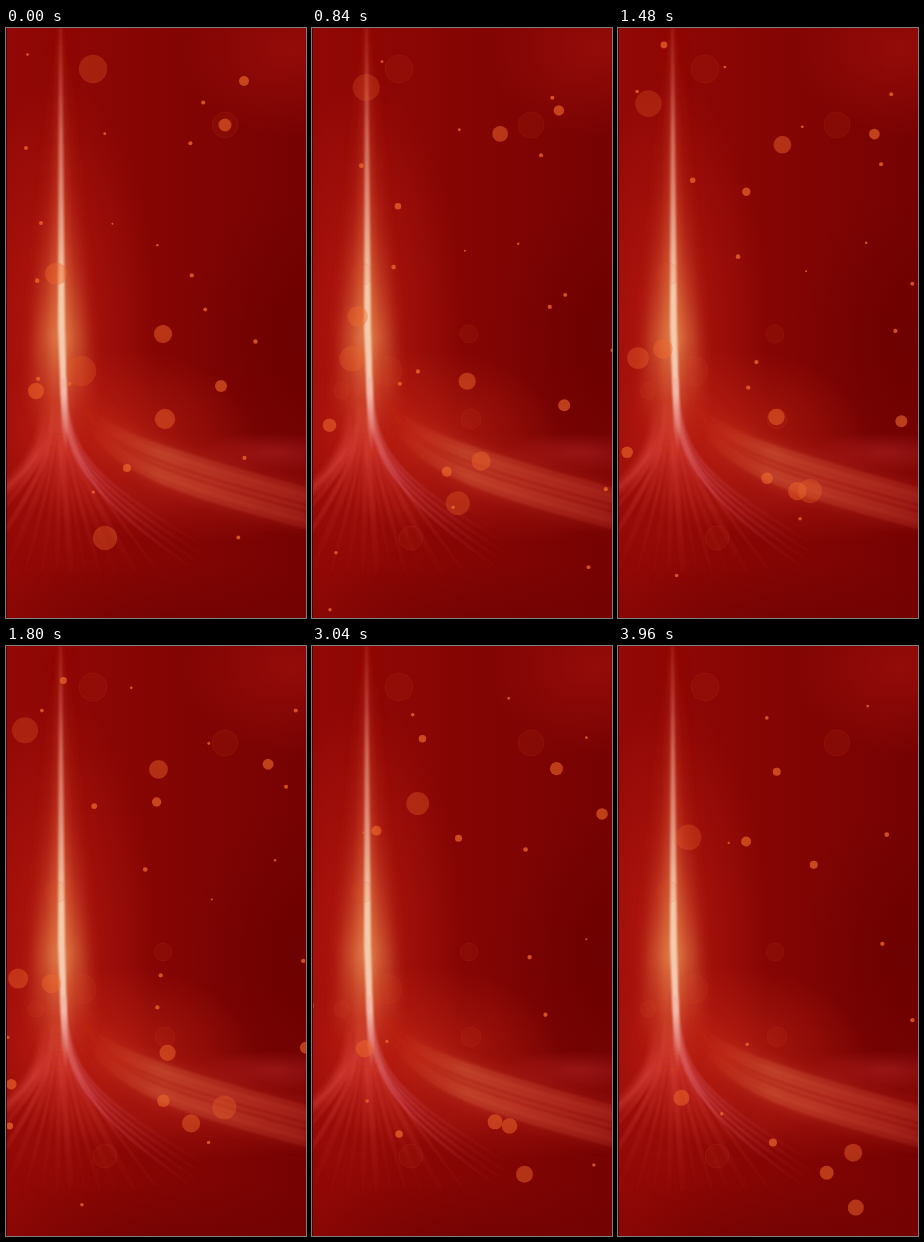
An HTML page that plays this animation: 300 px wide and 590 px high, repeating every 4 s.

```html
<!DOCTYPE html>
<html lang="en">
<head>
<meta charset="utf-8">
<title>Red light</title>
<style>
  html, body { margin: 0; width: 100%; height: 100%; overflow: hidden; background: #800404; }
  svg { display: block; width: 100vw; height: 100vh; }
</style>
</head>
<body>
<svg id="stage" viewBox="0 0 300 590" preserveAspectRatio="none">
  <defs id="defs">
    <linearGradient id="base">
      <stop offset="0" stop-color="#920806"/>
      <stop offset=".4" stop-color="#880604"/>
      <stop offset="1" stop-color="#760202"/>
    </linearGradient>
    <linearGradient id="beam" gradientUnits="userSpaceOnUse" x1="0" y1="0" x2="0" y2="430">
      <stop offset="0" stop-color="#c84438" stop-opacity=".3"/>
      <stop offset=".25" stop-color="#e08a78" stop-opacity=".75"/>
      <stop offset=".6" stop-color="#f6d6b8"/>
      <stop offset=".85" stop-color="#f8d4c0"/>
      <stop offset="1" stop-color="#e87880" stop-opacity="0"/>
    </linearGradient>
    <linearGradient id="halo" gradientUnits="userSpaceOnUse" x1="0" y1="0" x2="0" y2="430">
      <stop offset="0" stop-color="#b82820" stop-opacity=".3"/>
      <stop offset=".4" stop-color="#d04a2c" stop-opacity=".5"/>
      <stop offset=".72" stop-color="#e4844a" stop-opacity=".8"/>
      <stop offset="1" stop-color="#d84430" stop-opacity="0"/>
    </linearGradient>
    <linearGradient id="fan" gradientUnits="userSpaceOnUse" x1="0" y1="370" x2="0" y2="560">
      <stop offset="0" stop-color="#e86050" stop-opacity="0"/>
      <stop offset=".3" stop-color="#e45048" stop-opacity=".75"/>
      <stop offset="1" stop-color="#b02420" stop-opacity="0"/>
    </linearGradient>
    <linearGradient id="tail" gradientUnits="userSpaceOnUse" x1="55" y1="370" x2="195" y2="545">
      <stop offset="0" stop-color="#f0a8a0" stop-opacity=".6"/>
      <stop offset=".35" stop-color="#e0708c" stop-opacity=".85"/>
      <stop offset="1" stop-color="#c02a30" stop-opacity="0"/>
    </linearGradient>
    <linearGradient id="sweep" gradientUnits="userSpaceOnUse" x1="75" y1="0" x2="300" y2="0">
      <stop offset="0" stop-color="#d84428" stop-opacity="0"/>
      <stop offset=".35" stop-color="#e07048" stop-opacity=".85"/>
      <stop offset="1" stop-color="#cc4436" stop-opacity=".7"/>
    </linearGradient>
  </defs>
  <rect width="300" height="590" fill="url(#base)"/>
  <g id="glows"></g>
  <g id="light" fill="none"></g>
  <g id="dots" fill="#f06a2c"></g>
  <rect width="1" height="590" fill="#4a0606"/>
</svg>
<script>
const LOOP = 4000, STEP = 40;
const $ = id => document.getElementById(id);

function add(parent, tag, attrs) {
  const node = document.createElementNS($('stage').namespaceURI, tag);
  for (const k in attrs) node.setAttribute(k, attrs[k]);
  return parent.appendChild(node);
}

for (const size of [1, 3, 8]) {
  const filter = add($('defs'), 'filter',
    { id: 'b' + size, filterUnits: 'userSpaceOnUse', x: -50, y: -50, width: 400, height: 690 });
  add(filter, 'feGaussianBlur', { stdDeviation: size });
}

// Soft colour patches
function glow(cx, cy, rx, ry, color, opacity) {
  const id = 'g' + $('glows').childElementCount;
  const grad = add($('defs'), 'radialGradient', { id });
  [1, .5, 0].forEach((a, i) =>
    add(grad, 'stop', { offset: i / 2, 'stop-color': color, 'stop-opacity': a * opacity }));
  add($('glows'), 'ellipse', { cx, cy, rx, ry, fill: `url(#${id})` });
}
glow(285, 20, 110, 90, '#c01a14', .4);
glow(285, 310, 110, 150, '#640000', .5);
glow(150, 600, 220, 70, '#680202', .6);
glow(50, 300, 100, 250, '#cc2216', .6);
glow(110, 410, 140, 90, '#d02c1a', .55);
glow(200, 460, 170, 55, '#bc2018', .5);
glow(270, 424, 80, 20, '#c83034', .35);

const streak = (d, paint, width, opacity, blur) => add($('light'), 'path',
  { d, stroke: `url(#${paint})`, 'stroke-width': width, opacity, filter: `url(#b${blur})` });
const shape = (d, paint, opacity, blur) => add($('light'), 'path',
  { d, fill: `url(#${paint})`, opacity, filter: `url(#b${blur})` });

// Two bright bands with thin lines between, bending right
const bend = y => `M76 370 C88 ${y - 62} 150 ${y - 42} 305 ${y}`;
streak(bend(482), 'sweep', 34, .35, 8);
for (let i = 0; i <= 6; i++) {
  const bright = i % 4 === 1;
  streak(bend(462 + i * 6.5), 'sweep', bright ? 7 : 3, bright ? .55 : .22, bright ? 3 : 1);
}

// Fan below the beam
for (let i = 0; i < 13; i++) {
  const u = i / 12, x = -50 + u * 200, y = 500 + 70 * Math.sin(u * Math.PI * .8);
  streak(`M${46 + u * 14} 360 C${44 + u * 18} 420 ${42 + u * 26} 430 ${x} ${y}`,
    'fan', 3 + i * 5 % 4, .3 + (i * 7 % 5) * .07, 1);
}
streak('M43 340 C42 425 30 435 -10 470', 'fan', 10, .75, 3);

// Vertical beam and its pink tail
shape('M53 0 H57 C62 150 76 250 82 370 L70 430 H40 L28 370 C34 250 48 150 53 0Z', 'halo', .8, 8);
shape('M52 0 H57 L66 370 L62 425 H48 L43 370Z', 'halo', .75, 3);
shape('M53 0 H56 L59 300 L62 400 L60 430 L56 400 L52 300Z', 'beam', .9, 1);
for (let i = 0; i < 4; i++)
  streak(`M${56 + i} 350 C${57 + i * 2} 430 ${74 + i * 3} ${460 - i * 4} ${194 + i * 5} ${546 - i * 7}`,
    'tail', 2.2, .7 - i * .12, 1);

const dots = [];
const dot = (r0, r1, path) => dots.push({ node: add($('dots'), 'circle', {}), r0, r1, path });

// An orb drifts through three points; without a middle one, a light wind bends its way
function orb(r0, r1, start, end, mid) {
  mid = mid || start.map((p, i) => (p + end[i]) / 2 - [12, 5][i]);
  dot(r0, r1, u => start.map((p, i) =>
    p * (1 - u) * (1 - 2 * u) + mid[i] * 4 * u * (1 - u) + end[i] * u * (2 * u - 1)));
  // Large orbs leave a faint ring where they began
  if (r0 > 6) add($('light'), 'circle', { cx: start[0], cy: start[1], r: Math.max(r0, r1),
    fill: '#e0582c', 'fill-opacity': .08, stroke: '#d8502c', 'stroke-opacity': .12 });
}
orb(2, 8, [35, 195], [325, 93], [165, 151]);
orb(3, 4, [5, -78], [161, 127], [65, 45]);
orb(8, 2, [30, 363], [-15, 540], [3, 447]);
orb(14, 12, [87, 41], [-52, 156], [12, 90]);
orb(11, 8, [50, 246], [64, 454], [46, 348]);
orb(10, 8, [159, 391], [239, 563], [189, 486]);
orb(12, 12, [99, 510], [461, 534], [236, 462]);
orb(9, 7, [157, 306], [210, 529], [164, 418]);
orb(6.5, 13, [219, 97], [69, 193], [145, 128]);
orb(4, 9, [121, 440], [237, 508], [163, 458]);
orb(15, 4, [75, 343], [-3, 400], [8, 335]);
orb(6, 6, [215, 358], [430, 466]);
orb(2, 4, [20, 120], [198, 220]);
orb(5, 5, [-110, 164], [131, 196]);
orb(5, 6, [238, 53], [318, 209]);
orb(3, 4, [-101, 475], [158, 497]);

// Sparks all blow to the right, each with its own lift
let seed = 11;
const random = (lo, hi) => {
  seed = (seed * 16807) % 2147483647;
  return lo + (hi - lo) * seed / 2147483647;
};
for (let i = 0; i < 22; i++) {
  const x = random(-150, 270), y = i * 26 + random(-15, 15);
  const dx = random(200, 265), dy = random(-70, 150), r = random(1, 2.4);
  dot(r, r, u => [x + dx * u, y + dy * u]);
}

function draw(ms) {
  const u = Math.floor(ms % LOOP / STEP) * STEP / LOOP;
  for (const { node, r0, r1, path } of dots) {
    const [x, y] = path(u), r = r0 + (r1 - r0) * u;
    node.setAttribute('cx', x.toFixed(2));
    node.setAttribute('cy', y.toFixed(2));
    node.setAttribute('r', r.toFixed(2));
    node.setAttribute('opacity', (.85 - r * .045).toFixed(3));
  }
}
function tick() {
  draw(performance.now());
  requestAnimationFrame(tick);
}
tick();
</script>
</body>
</html>
```
